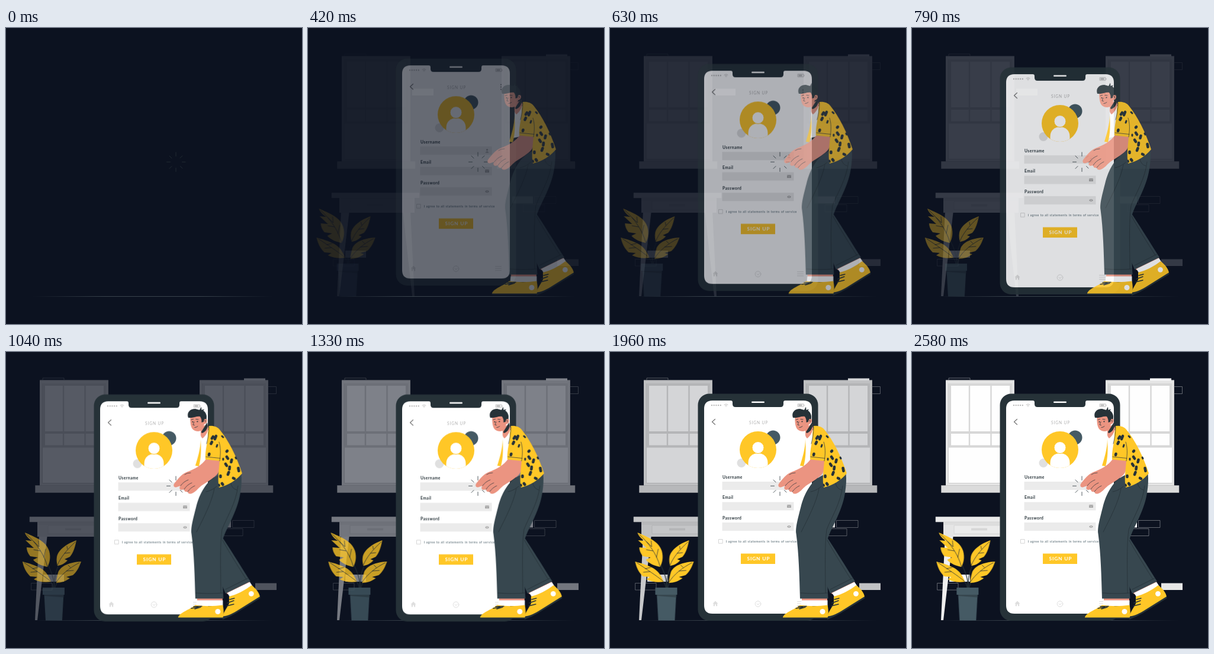
Write an HTML page that moves like this. It is 500x500 px and loops after 2620 ms.

```html
<!DOCTYPE html>
<html lang="en">
<head>
<meta charset="utf-8">
<title>Sign up</title>
<style>
html, body { margin: 0; width: 100%; height: 100%; overflow: hidden; background: #0c1220; }
svg { display: block; width: 100vw; height: 100vh; font-family: Lato, "Open Sans", sans-serif; }

.room, .phone, .man, .plant { animation: 2620ms linear infinite; }
.room { animation-name: fade; animation-timing-function: cubic-bezier(.39, 0, .68, 1); }
.phone { --x: 0px; --y: -30px; animation-name: slide; }
.man { --x: 30px; --y: 0px; animation-name: slide; }
.plant { animation-name: grow; }

@keyframes fade { from { opacity: 0 } to { opacity: 1 } }
@keyframes slide {
  0%, 4.96% { opacity: 0; transform: translate(var(--x), var(--y)); }
  4.962% {
    opacity: .06;
    transform: translate(calc(var(--x) * .94), calc(var(--y) * .94));
    animation-timing-function: cubic-bezier(.313, .278, .5, 1.352);
  }
  54.77%, 100% { opacity: 1; transform: translate(0, 0); }
}
@keyframes grow {
  0%, 4.96% { opacity: 0; transform: translate(-30px, 0); }
  4.962% {
    opacity: .017;
    transform: translate(-29.5px, 0);
    animation-timing-function: cubic-bezier(.333, .161, .499, 1.36);
  }
  100% { opacity: 1; transform: translate(0, 0); }
}

.line { fill: none; stroke-linecap: round; stroke-linejoin: round; }
.ink { stroke: #263238; stroke-width: .8; }
.dark { fill: #263238; }
.sun { fill: #ffc727; }
.skin { fill: #eb9481; }
.cloth { fill: #37474f; }
.white { fill: #fff; }
.label { font-size: 6.8px; font-weight: 700; letter-spacing: .4px; fill: #263238; }
</style>
</head>
<body>
<svg viewBox="0 0 500 500">
  <defs>
    <linearGradient id="fadeEnds">
      <stop offset="0" stop-color="#39434c" stop-opacity="0"/>
      <stop offset=".3" stop-color="#39434c"/>
      <stop offset=".7" stop-color="#39434c"/>
      <stop offset="1" stop-color="#39434c" stop-opacity="0"/>
    </linearGradient>
    <clipPath id="disc"><circle cx="250" cy="165" r="31"/></clipPath>
    <g id="window">
      <path fill="#e6e6e6" d="M57 47.5h116V226H57z"/>
      <path class="white" d="M62 53h107v168H62z"/>
      <g fill="none" stroke="#d8d8d8">
        <path stroke-width="4" d="M64 55h103v104.500H64zM64 136h103"/>
        <path stroke-width="2.400" d="M97 55v104M133.500 55v104"/>
        <path stroke="#c4c4c4" stroke-width=".7" d="M57.500 48h115v177M61.500 53v168.500h108"/>
      </g>
      <path fill="#dcdcdc" stroke="#bbb" stroke-width=".6" d="M49.500 225.500h131.500v12H49.500z"/>
    </g>
  </defs>

  <rect width="500" height="500" fill="#0c1220"/>
  <path fill="url(#fadeEnds)" d="M45 453h405v1H45z"/>

  <g class="room">
    <use href="#window"/>
    <use href="#window" x="270"/>
    <path class="white" d="M176 102.500h36v11.500h-36zM402 44.500h36v4h-36zM63 376h35v12H63zM345 284.500h35v12h-35z"/>
    <path fill="#e8e8e8" d="M421 390.500h36V402h-36z"/>
    <path class="line" stroke="#8d9096" stroke-width=".7" d="M62 47v-3h36v3M443 58.500h13.500v12H443M43 390.500h35V402H43zM383 284.500h36v12h-36zM364 298.500h36v12h-36z"/>
    <path fill="#f0f0f0" d="M56 308h14L53 453h-4zM160 308h13l7 145h-4z"/>
    <path fill="#e6e6e6" d="M53 287h127v25H53z"/>
    <path fill="#dedede" d="M53 287h127v5H53z"/>
    <path fill="#ececec" stroke="#cfcfcf" stroke-width=".7" d="M71 293h91v14H71z"/>
    <path fill="#d8d8d8" d="M100 297.500h27v4h-27z"/>
    <path fill="#ebebeb" stroke="#cfcfcf" stroke-width=".6" d="M40 278.500h148v8.500H40z"/>
  </g>

  <g class="plant">
    <path class="line ink" d="M94 399C95 384 90 372 83 357M95 399C94 380 97 368 107 350M93 399C92 388 85 383 72 379M96 399C98 387 106 380 116 373" style="stroke-width:1.300"/>
    <g class="sun">
      <path d="M45 305C60 312 80 318 86 336C89 347 87 356 83 363C74 361 65 358 59 351L67 347L54 345C50 340 48 335 48 330L60 331L46 318L57 319C51 315 47 311 45 305Z"/>
      <path d="M132 318C116 324 102 333 99 346C98 352 99 357 100 361C105 361 113 357 117 352L112 350L121 346C127 339 130 329 132 318Z"/>
      <path d="M41 354C59 359 76 364 83 376C86 381 88 385 89 388C79 390 68 388 60 384L66 380L54 379C47 372 43 364 41 354Z"/>
      <path d="M140 354C121 355 105 361 101 373C99 380 98 385 98 390C106 390 115 387 121 382L115 380L126 377C133 371 137 363 140 354Z"/>
    </g>
    <path class="line ink" d="M48 308C63 322 77 340 83 362M60 320l9 9-1-10M71 336l-11-2M77 347l3-14M130 321C117 333 105 347 100 360M117 333l-1-5M112 340l9-1M44 356C60 367 76 377 88 387M58 366l9-2M66 371l-11 1M137 356C121 364 106 376 98 389M122 364l-4-4M115 370l12-1"/>
    <path fill="#455a64" d="M77.500 408h33L108 453.500H80z"/>
    <path fill="#37474f" d="M77.500 409.500h33l-.3 5L78 412z"/>
    <path fill="#455a64" d="M75 398h37v12H75z"/>
  </g>

  <g class="phone">
    <rect class="dark" x="148.500" y="70.500" width="203" height="383.500" rx="19"/>
    <path class="white" d="M173 82H204Q207 82 207 85V88Q207 93 212 93H288Q293 93 293 88V85Q293 82 296 82H327Q341 82 341 96V428Q341 442 327 442H173Q159 442 159 428V96Q159 82 173 82Z"/>
    <rect class="white" x="239" y="83.500" width="22" height="2.400" rx="1.200"/>

    <path class="line" stroke="#bdbdbd" stroke-width="2.400" stroke-dasharray="0 3.700" d="M172 90h15.500"/>
    <g class="line" stroke="#bdbdbd" stroke-width=".9">
      <path d="M193 89Q196 86.500 199 89M194.500 90.700Q196 89.500 197.500 90.700M196 92.200v.1"/>
      <path d="M317.500 87.800h9.500v4.400h-9.500zM328 89.300v1.500"/>
    </g>
    <path fill="#bdbdbd" d="M318.500 88.500h6v3h-6z"/>
    <path class="line" stroke="#757575" stroke-width="1.200" d="M177.500 113.500l-5 4.500 5 4.500"/>
    <path class="line" stroke="#757575" stroke-width="2" stroke-dasharray="0 4" d="M326 114.500v8.100"/>
    <text x="235" y="122" font-size="6.600" letter-spacing=".9" fill="#b0b0b0">SIGN UP</text>

    <circle cx="275.500" cy="144.500" r="12" fill="#455a64"/>
    <circle cx="222" cy="187.500" r="7.500" fill="#e0e0e0"/>
    <circle class="sun" cx="250" cy="165" r="31"/>
    <g class="white">
      <path clip-path="url(#disc)" d="M233.500 197V187C233.500 165.500 266.500 165.500 266.500 187V197Z"/>
      <circle class="white" cx="250" cy="161.500" r="10" stroke="#ffc727" stroke-width="1"/>
    </g>

    <path fill="#ebebeb" d="M189.500 219h121v14h-121zM189.500 253.500h121v14h-121zM189.500 288h121v14h-121z"/>
    <text class="label" x="190" y="213.500">Username</text>
    <text class="label" x="190" y="248">Email</text>
    <text class="label" x="190" y="282.500">Password</text>
    <g fill="#a6a6a6">
      <circle cx="302.500" cy="224.500" r="1.600"/>
      <path d="M299.500 229.500q3-4.500 6 0zM299 258h7v5h-7zM299 295q3.500-4 7 0q-3.500 4-7 0z"/>
      <circle cx="302.500" cy="295" r=".9" fill="#ebebeb"/>
    </g>
    <path class="line" stroke="#ebebeb" stroke-width=".5" d="M299 258.500l3.500 2.500 3.500-2.500"/>

    <path fill="none" stroke="#ccc" stroke-width=".8" d="M183.500 316.500h6.700v6.700h-6.700z"/>
    <text x="196" y="322" font-size="5.200" letter-spacing=".5" fill="#455a64">I agree to all statements in terms of service</text>
    <path class="sun" d="M221 340.500h58V358h-58z"/>
    <text class="white" x="231.500" y="352.400" font-size="8.400" font-weight="700" letter-spacing=".8">SIGN UP</text>

    <path fill="#dedede" d="M173.500 425l4.500-4.500 4.500 4.500h-1.300v4.300h-2.200v-3h-2v3h-2.200V425z"/>
    <g class="line" stroke="#dedede" stroke-width="1">
      <circle cx="250" cy="425.500" r="4.800"/>
      <path d="M248 425l2 2 2.500-2.500M316.500 421.500h10M316.500 425h10M316.500 428.500h10"/>
    </g>
  </g>

  <path class="line ink" d="M287 210v6.500M287 236.500v6M271.500 226.300h6M297.500 226.300h5.500M276 216l4 4M298 216l-4 3.500M276 237.500l4-4M298 237l-3.500-3.500"/>

  <g class="man">
    <!-- rear leg -->
    <path class="skin" d="M373 406L411 387L414 390L375 409Z"/>
    <path class="white" d="M375 407L413 388.500L418 396L380 415Z"/>
    <path class="dark" d="M367 447L430 412L430.500 416L390 441Q378 448 367 452Z"/>
    <path class="sun" d="M378 413Q398 408 416 394C424 400 429 407 430 413L390 438C382 443 374 446 367 446.500C369 439 375 431 378 425Z"/>
    <circle class="white" cx="415.500" cy="408.300" r="4.400"/>
    <path class="line ink" style="stroke-width:1.400" d="M375 424l11-4M374 429l12-3M379 418l8-2"/>
    <path class="cloth" d="M362 306C378 330 398 362 414 387.500L372 408L352 360Z"/>

    <!-- front leg -->
    <path class="skin" d="M324 415h43v5h-43z"/>
    <path class="white" d="M323.500 419.500H367.500V429H322.500Z"/>
    <path class="sun" d="M292 448C295 440 310 436 321 427.500Q344 431 367.500 427.500C369 435 369.500 443 367.500 449H292Z"/>
    <path class="dark" d="M291.500 448.500H368V450.500H291.500Z"/>
    <circle class="white" cx="359" cy="438.500" r="4.500"/>
    <path class="line ink" style="stroke-width:1.400" d="M318 430l14-.5M314 433l12-2M320 434l10-3"/>
    <path class="cloth" d="M360 208C343 215 330 234 323 259C317 283 313 297 314.500 307C319 340 320 380 321 416.500H368.500C367.500 385 364 345 367 319C371 300 392 272 397 238Q400 220 398.500 205Z"/>
    <path class="line ink" d="M357 227C351 232 345 235 339 236M353 231C349 254 334 282 323 304M393 226C390 255 374 279 366 300C362 330 364 370 364 407M367 318C378 338 393 362 407 384M322 407Q346 409 368 407M372 401L410 382M381 222q2 9 10 11"/>

    <!-- torso -->
    <path class="white" d="M330 138L344 131L346 182L327 186Q331 160 330 138Z"/>
    <path class="sun" d="M330 147C330 163 325 179 321 192L327 193C331 179 331 165 330 147Z"/>
    <path class="skin" d="M330 129L341 121L343 129C342 136 338 142 333 146Q329 142 330 137Z"/>

    <!-- arm -->
    <path class="skin" d="M339 181C332 191 320 198 306 203C298 206 291 215 285.500 222C282.500 226.500 286 230 290 228L296 226Q292 231 297 233L302 232Q302 237 308 236Q309 241 315 239C321 237 325 231 331 226C341 219 353 213 359 205Q364 197 364 182Z"/>
    <path class="line ink" style="stroke-width:.7" d="M296 226Q301 219 309 216M302 232Q307 224 315 221M308 236Q313 229 320 226M303 207Q307 204 313 204"/>

    <path class="sun" d="M344 125C351 124 358 126 362 131C377 149 391 177 400 205C390 217 377 225 361 229C358 215 361 198 362 184L338 181.500C337 165 343 150 342 137Z"/>
    <path class="line ink" style="stroke-width:.7" d="M344 127C344 138 342 147 340 155M362 184C364 172 364 161 361 152M339 177L363 179.500"/>
    <path class="line" stroke="#263238" stroke-width="4.600" d="M356 142l-2 5M349 152l-1.500 3M351 143l-2 3M344.500 172l-.5 2M375 167l-1 1M374 177l2 3M382.500 182l-1 4M372 189l2 3M379 194l-.5 4M377.500 203l-1.500 4M393.500 196l1 5M366 222l1.500 2M363.500 209l0 2M385 213l2 1"/>
    <path class="line" stroke="#263238" stroke-width="3" d="M358 157l-1 3M366 142l2 2M368 180l0 2M389 178l1 2M361 224l.5 2"/>

    <!-- head -->
    <path class="dark" d="M331 135L341 119L342 125C341 131 337 136 332 137Z"/>
    <path class="skin" d="M312.500 109C312 118 313 127 317 131C322 135 330 135 333 130Q336 126 336 122Q341 121 341 116Q340 110 336 112L331 104L315 106Z"/>
    <path class="dark" d="M309 111C306 102 312 96 321 96L328 98L331 92.500L331.500 98L336 96.500L334.500 99C340 103 341 109 339.500 114Q336 111 335 118L331.500 119Q332 113 329 109C323 108 317 112 310 111Z"/>
    <path class="line ink" d="M314 114.500l3.500-1M322 113.500l4 .5M319 118l-2 5 2.500.5M320 127.500q3 0 5-2M337 115q2 0 1 3"/>
    <circle class="dark" cx="316.500" cy="118" r="1"/>
    <circle class="dark" cx="324.500" cy="117.500" r="1.100"/>
  </g>
</svg>
</body>
</html>
```
